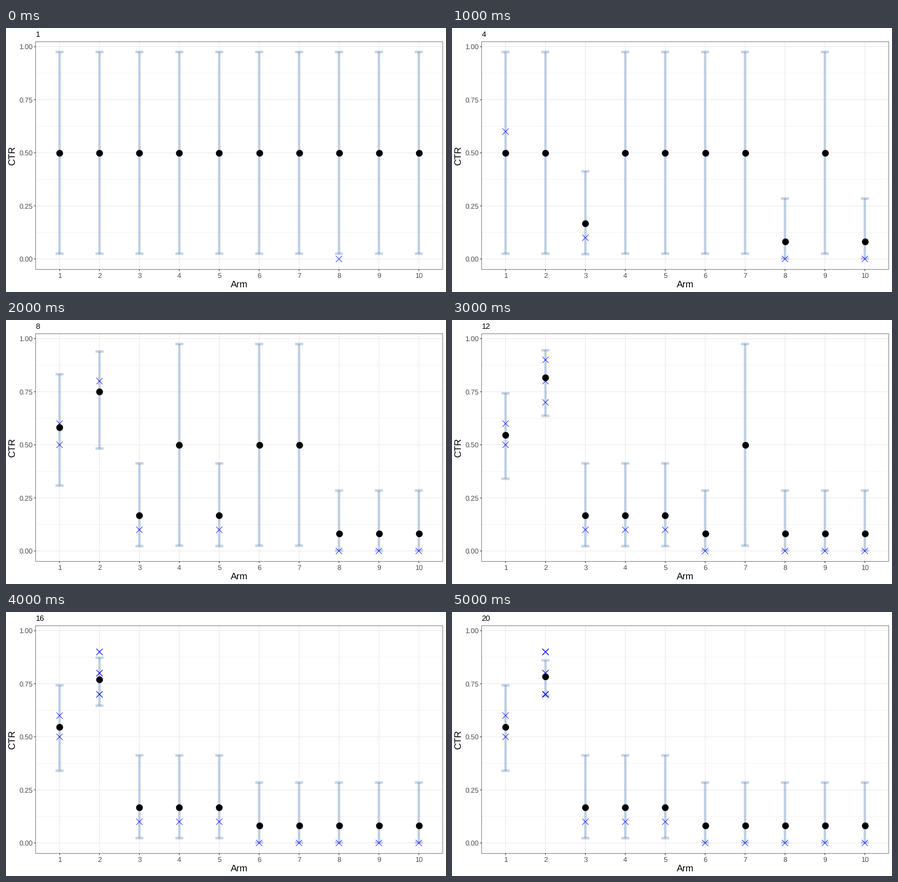
Recreate the animation shown at these times as a matplotlib script. Size 750x450 px, loop 6 s.

```python
import numpy as np
import matplotlib.pyplot as plt
from matplotlib.animation import FuncAnimation
from matplotlib.collections import LineCollection

W, H, DPI = 750, 450, 100
PX = 72 / DPI  # points per pixel

plt.rcParams["font.family"] = "Liberation Sans"
plt.rcParams["text.hinting"] = "none"

# Panel edges and data scales, in pixels from the top left
LEFT, RIGHT, TOP, BOTTOM = 50.5, 744.5, 23.2, 411.4
ARMS = 10
STEP_X = (RIGHT - LEFT) / (ARMS + 0.2)
UNIT_Y = (BOTTOM - TOP) / 1.1 / 0.975
ZERO_Y = BOTTOM - (BOTTOM - TOP) * 0.05 / 1.1

# Each round: (arm pulled, clicks out of ten)
PULLS = [
    (8, 0), (10, 0), (3, 1), (1, 6),
    (2, 8), (5, 1), (9, 0), (1, 5),
    (4, 1), (6, 0), (2, 9), (2, 7),
    (7, 0), (2, 8), (2, 7), (2, 9),
    (2, 9), (2, 7), (2, 7), (2, 7),
]
ROUNDS = [1, 4, 8, 12, 16, 20]
TRIALS = 10


def px(arm):
    return LEFT + (arm - 0.4) * STEP_X


def py(rate):
    return ZERO_Y - rate * UNIT_Y


def beta_interval(a, b):
    """Central 95 % interval of a Beta(a, b) distribution."""
    edges = np.linspace(0, 1, 8001)
    mid = (edges[1:] + edges[:-1]) / 2
    log_pdf = (a - 1) * np.log(mid) + (b - 1) * np.log(1 - mid)
    cdf = np.concatenate([[0], np.cumsum(np.exp(log_pdf - log_pdf.max()))])
    return np.interp([0.025, 0.975], cdf / cdf[-1], edges)


def posterior(rounds):
    """Mean, low and high for every arm after the given rounds."""
    out = []
    for arm in range(1, ARMS + 1):
        hits = [k for a, k in rounds if a == arm]
        a = 1 + sum(hits)
        b = 1 + TRIALS * len(hits) - sum(hits)
        out.append((a / (a + b), *beta_interval(a, b)))
    return out


fig = plt.figure(figsize=(W / DPI, H / DPI), dpi=DPI, facecolor="white")
ax = fig.add_axes([0, 0, 1, 1])
ax.set_xlim(0, W)
ax.set_ylim(H, 0)
ax.axis("off")


def add_lines(segs, color, width, z, **kw):
    lines = LineCollection(segs, colors=[color], linewidths=width * PX,
                           zorder=z, capstyle="butt", **kw)
    lines.set_snap(False)
    return ax.add_collection(lines, autolim=False)


def label(x, y, s, size, color="black", **kw):
    return ax.text(x, y, s, fontsize=size * PX, color=color, **kw)


def hline(y, x0=LEFT, x1=RIGHT):
    return [(x0, y), (x1, y)]


def vline(x, y0=TOP, y1=BOTTOM):
    return [(x, y0), (x, y1)]


# Grid, frame and ticks
xs = [px(a) for a in range(1, ARMS + 1)]
major = np.arange(5) / 4
add_lines([hline(py(v)) for v in major[:-1] + 0.125], "#ebebeb", 0.55, 1)
add_lines([hline(py(v)) for v in major] + [vline(x) for x in xs],
          "#ebebeb", 1.07, 1)
add_lines([hline(TOP + 0.3), hline(BOTTOM + 0.1), vline(LEFT),
           vline(RIGHT - 0.1)], "#333333", 0.6, 5)
add_lines([hline(py(v), LEFT - 2.75, LEFT) for v in major]
          + [vline(x, BOTTOM, BOTTOM + 2.75) for x in xs], "#333333", 1.07, 5)

# Axis text
for v in major:
    label(45.4, py(v) + 4.3, f"{v:.2f}", 12, "#4d4d4d", ha="right")
for arm, x in enumerate(xs, 1):
    label(x, 426, str(arm), 12, "#4d4d4d", ha="center")
label((LEFT + RIGHT) / 2, 442, "Arm", 16, ha="center")
label(11, (TOP + BOTTOM) / 2, "CTR", 16, rotation=90, ha="center", va="center")

# Moving parts
counter = label(LEFT, 15, "", 13.2)
bars = add_lines([], (66 / 255, 113 / 255, 174 / 255, 0.3), 4.27, 2)
crosses = add_lines([], "blue", 0.75, 3)
dots = ax.scatter(xs, xs, s=(11.5 * PX) ** 2, c="black", linewidths=0, zorder=4)


def bar_parts(x, low, high):
    cap = 0.1 * STEP_X
    return [hline(py(high), x - cap, x + cap), vline(x, py(high), py(low)),
            hline(py(low), x - cap, x + cap)]


def cross_parts(x, y, r=5.3):
    return [[(x - r, y - r), (x + r, y + r)], [(x - r, y + r), (x + r, y - r)]]


def draw(i):
    n = ROUNDS[i]
    # Beliefs lag one round behind the observed clicks
    stats = posterior(PULLS[:n - 1])
    counter.set_text(str(n))
    bars.set_segments([s for x, (_, lo, hi) in zip(xs, stats)
                       for s in bar_parts(x, lo, hi)])
    crosses.set_segments([s for arm, k in PULLS[:n]
                          for s in cross_parts(px(arm), py(k / TRIALS))])
    dots.set_offsets([(x, py(m)) for x, (m, _, _) in zip(xs, stats)])
    return counter, bars, crosses, dots


anim = FuncAnimation(fig, draw, frames=len(ROUNDS), init_func=lambda: draw(0),
                     interval=1000, repeat=True, repeat_delay=0)
plt.show()
```
